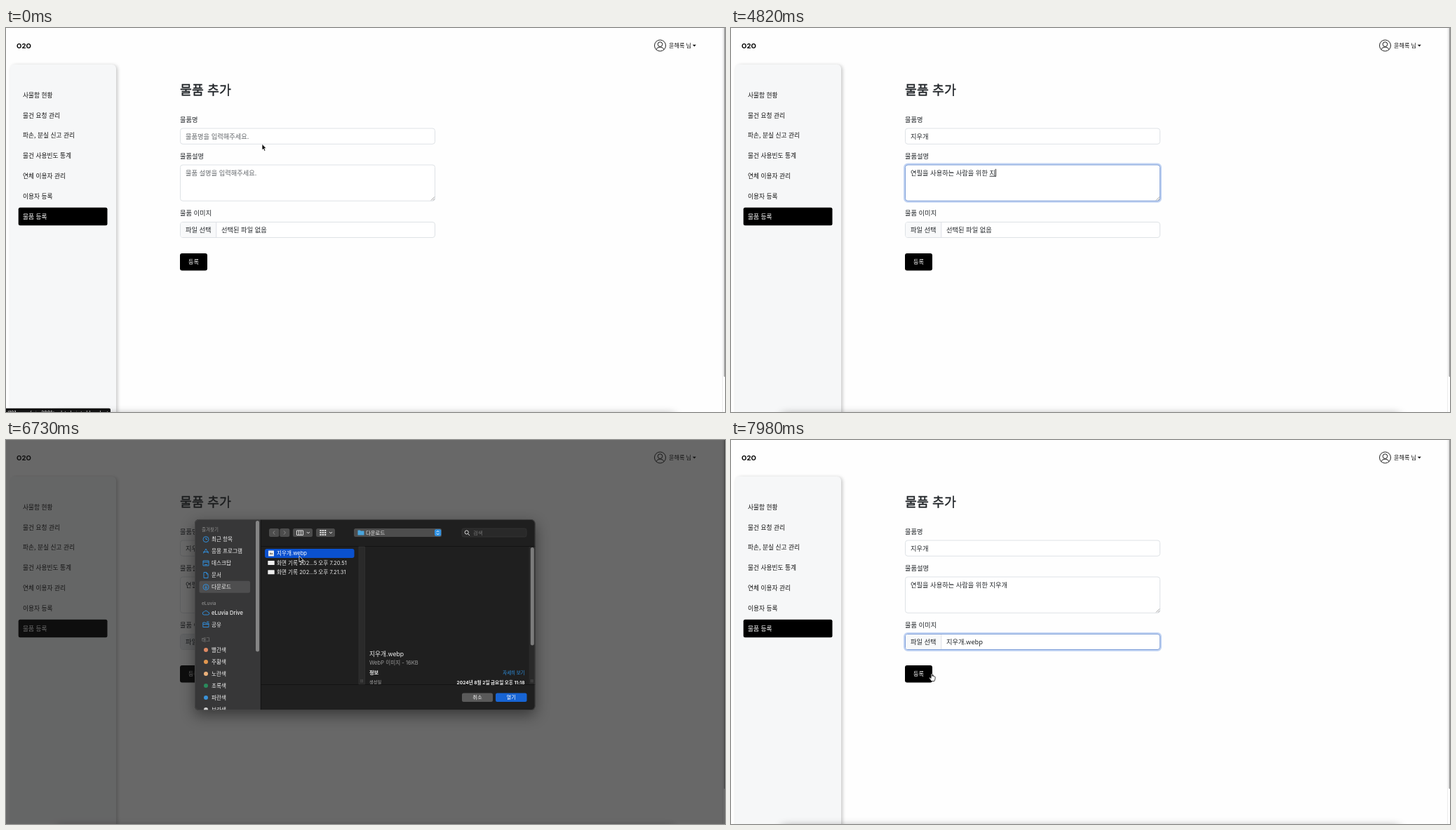
An HTML page that plays this animation: 1025x547 px, repeating every 8 s.

```html
<!DOCTYPE html>
<html lang="ko">
<head>
<meta charset="utf-8">
<title>물품 추가</title>
<style>
  html, body { margin: 0; width: 100%; height: 100%; overflow: hidden; background: #fefefe; }
  svg { display: block; width: 100vw; height: 100vh; font-family: "Noto Sans CJK KR", Inter, sans-serif; }
  text { white-space: pre; }
  .mac { font-family: Inter, "Noto Sans CJK KR", sans-serif; }
  #dialog { --accent: #2f93e6; filter: drop-shadow(0 7px 10px rgba(0,0,0,.45)); }
  .icon { fill: none; stroke: var(--accent); stroke-width: .9; }
  .compose { text-decoration: underline; }
</style>
</head>
<body>
<script>
const LOOP = 8000;
const text = (x, mid, s, size = 9.25, fill = '#212529', more = '') =>
  `<text x="${x}" y="${mid + size * .37}" font-size="${size}" fill="${fill}" ${more}>${s}</text>`;
const rect = (x, y, w, h, r, fill, more = '') =>
  `<rect x="${x}" y="${y}" width="${w}" height="${h}" rx="${r}" fill="${fill}" ${more}/>`;
const path = (d, more = 'class="icon"') => `<path d="${d}" ${more}/>`;
const circle = (x, y, r, more) => `<circle cx="${x}" cy="${y}" r="${r}" ${more}/>`;
const END = ' text-anchor="end"', MID = ' text-anchor="middle"', BOLD = ' font-weight="700"', MEDIUM = ' font-weight="500"';

// ---------- page ----------
const field = (id, y, h) =>
  rect(248.5, y, 363, h, 3.5, '#fff', 'stroke="#dee2e6"') +
  `<g id="${id}Ring">` + rect(248.5, y, 363, h, 3.5, 'none', 'stroke="#c2d4f3" stroke-width="5"') +
  rect(248.5, y, 363, h, 3.5, '#fff', 'stroke="#7f9fd8"') + '</g>';

const entry = (id, mid, hint) =>
  `<g id="${id}Hint">${text(256, mid, hint, 9.25, '#63676b')}</g>` +
  `<text id="${id}Text" x="256" y="${mid + 3.4}" font-size="9.25" fill="#212529"><tspan></tspan><tspan class="compose"></tspan></text>` +
  rect(256, mid - 5.5, .8, 11, 0, '#000', `id="${id}Caret"`);

const menu = ['사물함 현황', '물건 요청 관리', '파손, 분실 신고 관리', '물건 사용빈도 통계', '연체 이용자 관리', '이용자 등록', '물품 등록']
  .map((s, i) => text(24, 95.5 + i * 28.8, s, 8.72, i == 6 ? '#fff' : '#111')).join('');

const page =
  rect(0, 0, 1025, 547, 0, '#fefefe') +
  text(15, 25.3, 'O2O', 9.6, '#000', BOLD + ' class="mac"') +
  circle(932.5, 25, 8, 'fill="none" stroke="#222"') +
  circle(932.5, 23.2, 3.3, 'fill="none" stroke="#222"') +
  path('M926.8 30.6q1.6-3.4 5.7-3.4t5.7 3.4', 'fill="none" stroke="#222"') +
  text(945, 25, '윤해록 님', 8.1, '#111') + path('M978.8 23.8h5l-2.5 2.8z', 'fill="#111"') +
  rect(6, 52, 151, 520, 6, '#f6f7f8', 'style="filter:drop-shadow(2px 1px 2.5px rgba(0,0,0,.22))"') +
  rect(17.7, 255.7, 126.8, 25.6, 2.5, '#000') + menu +
  text(248, 88, '물품 추가', 18.4, '#212529', 'stroke="#212529" stroke-width=".35"') +
  text(248, 130.5, '물품명') + text(248, 182.8, '물품설명') + text(248, 264, '물품 이미지') +
  field('name', 143, 22.3) + entry('name', 154.2, '물품명을 입력해주세요.') +
  field('desc', 195, 51.3) + entry('desc', 206.3, '물품 설명을 입력해주세요.') +
  path('M606 245.5l5-5M608.8 245.5l2.2-2.2', 'stroke="#777" stroke-width=".7"') +
  field('file', 276.5, 22) +
  path('M300 277H251.5q-2.5 0-2.5 2.5v16q0 2.5 2.5 2.5H300z', 'id="pick"') +
  path('M299.8 277v21', 'stroke="#dee2e6"') +
  text(256, 287.7, '파일 선택') + text(307, 287.7, '', 9.25, '#212529', 'id="chosen"') +
  rect(248, 321, 39, 24.5, 3, '#000') + text(267.5, 333.3, '등록', 8.1, '#fff', MID) +
  rect(70, 550, 885, 20, 8, '#000', 'style="filter:drop-shadow(0 0 6px rgba(0,0,0,.4))"') +
  path('M1021.5 0v547', 'stroke="#ececec"') + rect(1023.4, -4, 4, 501, 1.5, '#a4a4a4') +
  `<g id="status" class="mac">${rect(-4, 541.8, 153, 12, 2, '#111')}` +
  text(-3, 548.2, '1d101.p.ssafy.io:3001/web/admin/addproduct', 7, '#fff') + '</g>';

// ---------- file dialog ----------
const side = (y, s, icon) => `<g transform="translate(285 ${y})">${icon}</g>` + text(293, y, s, 7.6, '#f0f0f0', MEDIUM);
const head = (y, s) => text(279, y, s, 6.5, '#8d8d8d', MEDIUM);
const ring = circle(0, 0, 4, 'class="icon"');
const tags = ['빨간색 #e08a64', '주황색 #e2974f', '노란색 #eab07a', '초록색 #2a8a5c', '파란색 #3a92d8', '보라색 #d0d0d0']
  .map((s, i) => { const [label, c] = s.split(' '); return side(299 + i * 17, label, circle(0, 0, 3, `fill="${c}"`)); }).join('');
const row = (y, s) => rect(373.3, y - 3, 9.4, 6, .6, '#eee') + text(386, y, s, 7.6, '#eee');
const grip = x => path(`M${x - 1} 341v4.5M${x + 1.2} 341v4.5`, 'stroke="#666" stroke-width=".7"');
const strip = x => rect(x, 152, 8.5, 196, 0, '#2a2a2a', 'stroke="#383838" stroke-width=".6"');
const pill = (x, w, fill) => rect(x, 126, w, 12, 2.5, fill);
const stroke = c => `fill="none" stroke="${c}" stroke-width="1"`;

const dialog =
  `<clipPath id="frame">${rect(269, 113, 485.5, 272, 6, '#000')}</clipPath><g clip-path="url(#frame)">` +
  rect(269, 113, 486, 272, 0, '#1f1f1f') + rect(269, 113, 94, 272, 0, '#373738') +
  path('M363.3 113v272M363 151.5h392M363 348.5h392', 'stroke="#111" stroke-width=".8" fill="none"') +
  rect(275.5, 200.7, 72.5, 17, 2.5, '#4e4e4f') +
  head(127.5, '즐겨찾기') +
  side(141.5, '최근 항목', ring + path('M0-2.5V0H2')) +
  side(158.5, '응용 프로그램', path('M-3.5 3L0-3.5 3.5 3M-4 1H4')) +
  side(175.5, '데스크탑', path('M-4-3.5H4V3.5H-4zM-4-1.5H4M-2 2H2')) +
  side(192.5, '문서', path('M-3-4H.8L3-1.6V4H-3zM.8-4V-1.6H3')) +
  side(209.5, '다운로드', ring + path('M0-2.2V2M-1.7.4L0 2 1.7.4')) +
  head(232.5, 'eLuvia') +
  side(246, 'eLuvia Drive', path('M-2.6 3H2.8a1.9 1.9 0 0 0 0-3.8A3 3 0 0 0-2.6-1.2a2.1 2.1 0 0 0 0 4.2z')) +
  side(263, '공유', path('M-4.2 3.5V-3H-1L0-2H4V3.5zM-4-.4H4M1-4H4.4')) +
  head(285, '태그') + tags +
  rect(356, 115, 5, 186.5, 2.5, '#858585') +
  pill(375, 14.3, '#4d4d4d') + pill(390.3, 14, '#4d4d4d') + pill(409, 28, '#4b4b4b') + pill(442, 27, '#4b4b4b') + pill(496, 125, '#4d4d4d') +
  path('M383.2 129.3l-2.4 2.7 2.4 2.7M396 129.3l2.4 2.7-2.4 2.7', stroke('#888')) +
  path('M414.5 129h9v6.5h-9zM417.5 129v6.5M420.5 129v6.5M428.8 131l2 2 2-2M461 131l2 2 2-2', stroke('#ddd')) +
  path('M447.3 129h9M447.3 132h9M447.3 135h9', 'stroke="#ddd" stroke-width="2" stroke-dasharray="2.4 .9"') +
  path('M501.5 128.5h3.3l1 1.1h4.7v6h-9z', 'fill="#4aa5dc"') + text(513, 132, '다운로드', 7.4, '#eee') +
  rect(611, 127.3, 9.2, 9.4, 2, 'var(--accent)') +
  path('M613.8 131.2l1.8-1.8 1.8 1.8M613.8 133l1.8 1.8 1.8-1.8', stroke('#fff')) +
  rect(650, 126, 92, 12, 2.5, '#292929', 'stroke="#383838" stroke-width=".7"') +
  circle(656.7, 131.5, 2.6, stroke('#ddd')) + path('M658.6 133.5l2.4 2.6', stroke('#ddd')) + text(666, 132, '검색', 7.4, '#777') +
  strip(503) + grip(507) +
  rect(369, 155, 127.5, 13, 3, '#0a51cf', 'id="selected"') +
  rect(374, 157.5, 8, 8, .5, '#eee') + path('M375.5 163l1.5-3 1.5 2 1-1.5 1.3 2.5z', 'fill="#777"') +
  text(386, 161.5, '지우개.webp', 7.6, '#fff') +
  `<g id="more">${row(175, '화면 기록 202…5 오후 7.20.51')}${row(188.3, '화면 기록 202…5 오후 7.21.31')}</g>` +
  `<g id="blank">${strip(651)}</g>` +
  `<g id="preview">${rect(745.5, 152, 9, 196, 0, '#292929')}${rect(747.8, 153, 5, 139.5, 2.5, '#7c7c7c')}${grip(749.7)}` +
  text(518, 304.5, '지우개.webp', 8.7, '#eee') + text(518, 317, 'WebP 이미지 - 16KB', 7.6, '#9a9a9a') +
  text(518, 331.4, '정보', 7.2, '#f2f2f2', BOLD) + text(739.5, 331.6, '자세히 보기', 6.4, 'var(--accent)', END) +
  text(518, 345.2, '생성일', 6.2, '#aaa') + text(739.5, 345.2, '2024년 8월 2일 금요일 오후 11:18', 6.6, '#eee', END + BOLD) + '</g>' +
  rect(650, 360.5, 44, 12.5, 2.5, '#5a5a5a') + text(672, 366.7, '취소', 7.3, '#f0f0f0', MID) +
  rect(698, 360.5, 44.5, 12.5, 2.5, '', 'id="open"') + text(720.2, 366.7, '열기', 7.3, '', MID + ' id="openText"') +
  '</g>' + rect(269.4, 113.4, 484.7, 271.2, 6, 'none', 'stroke="#4c4c4c" stroke-width=".8"');

const eraser = (x, y, w, h, a) => `<g transform="translate(${x} ${y}) rotate(${a})">` +
  rect(-w / 2, -h / 2, w, h, 1.5, '#e4e6e9', 'stroke="#b5bac4" stroke-width=".6"') +
  rect(-w / 2, -h * .36, w, h * .76, 0, '#2b4f8c') +
  rect(-w / 2, -h * .36, w, h * .12, 0, '#1c2f52') +
  rect(-w * .22, -h * .15, w * .44, h * .3, 1, '#bccbe2') + '</g>';

const photo = rect(567, 157, 124, 124.5, 3, '#e4e4e4') + rect(571, 161, 13, 13, 0, '#b8434c') +
  eraser(591, 224, 20, 70, 22) + eraser(631, 222, 28, 82, 18) + eraser(665, 223, 18, 78, 22);

// ---------- pointer ----------
const outline = 'fill="#000" stroke="#fff" stroke-width=".8" stroke-linejoin="round"';
const pointer =
  `<g id="arrow">${path('M0 0V8.6L1.9 6.9 3.3 10 4.9 9.3 3.5 6.3H6.1z', outline)}</g>` +
  `<g id="beam">${path('M-1.8-5q1.8 0 1.8 1.2V3.8Q0 5-1.8 5M1.8-5Q0-5 0-3.8V3.8Q0 5 1.8 5', 'fill="none" stroke="#222" stroke-width=".8"')}</g>` +
  `<g id="hand">${path('M-.9.8Q0-.4.9.8V4Q2-.2 2.5 4.1 3.6 3.4 3.9 4.6 5.2 4.1 5.2 5.8 5.2 8.5 3.9 11H-.5Q-1.6 9-3.2 7-3.8 5.4-2.4 5.7L-.9 7z',
    'fill="#fff" stroke="#111" stroke-width=".8" stroke-linejoin="round"')}</g>`;

document.body.innerHTML = `<svg viewBox="0 0 1025 547">${page}${rect(0, 0, 1025, 547, 0, '#161616', 'id="dim"')}` +
  `<g id="sheet"><g id="dialog" class="mac">${dialog}</g><g id="photo">${photo}</g></g><g id="pointer">${pointer}</g></svg>`;

// ---------- motion ----------
const $ = id => document.getElementById(id);
const show = (id, on) => { $(id).style.opacity = +on; };

// Value of the last key reached.
const hold = (t, keys) => keys.reduce((v, k) => t >= k[0] ? k[1] : v, keys[0][1]);
// Linear or eased travel between keys.
function track(t, keys, ease = u => u) {
  const i = keys.findIndex(k => k[0] > t);
  if (i < 0) return keys.at(-1)[1];
  if (!i) return keys[0][1];
  const [t0, a] = keys[i - 1], [t1, b] = keys[i];
  return a + (b - a) * ease((t - t0) / (t1 - t0));
}
const smooth = u => u * u * (3 - 2 * u);
const fade = (t, on, off) => track(t, [[on, 0], [on + 150, 1], [off, 1], [off + 150, 0]]);

// Each key press of a Hangul input method: [finished text, syllable in work].
function keystrokes(s) {
  const leads = 'ㄱㄲㄴㄷㄸㄹㅁㅂㅃㅅㅆㅇㅈㅉㅊㅋㅌㅍㅎ', out = [['', '']];
  [...s].forEach((c, i) => {
    const done = s.slice(0, i), n = c.charCodeAt(0) - 0xAC00;
    if (n < 0) return out.push([done + c, '']);
    out.push([done, leads[Math.floor(n / 588)]]);
    out.push([done, String.fromCharCode(0xAC00 + n - n % 28)]);
    if (n % 28) out.push([done, c]);
  });
  return out;
}
const nameKeys = keystrokes('지우개'), descKeys = keystrokes('연필을 사용하는 사람을 위한 지우개');

function type(id, keys, count, focused) {
  const [done, work] = keys[Math.floor(count + 1e-6)], el = $(id + 'Text'), [a, b] = el.children;
  a.textContent = done;
  b.textContent = work;
  b.style.textDecoration = focused ? '' : 'none';
  show(id + 'Hint', !(done + work));
  show(id + 'Caret', focused);
  $(id + 'Caret').setAttribute('x', 256 + el.getComputedTextLength());
}

const moveX = [[860, 365], [1330, 358], [2350, 358], [2850, 344], [5510, 344], [5930, 278], [6190, 406.5],
  [6320, 409], [6590, 418], [6930, 418], [7350, 366], [7490, 366], [7980, 286]];
const moveY = [[860, 165.3], [1330, 155], [2350, 155], [2850, 217], [5510, 217], [5930, 288], [6190, 281],
  [6320, 260], [6590, 165], [6930, 165.5], [7350, 190], [7490, 190], [7980, 332.5]];

function pointerKind(t, x, y) {
  if (t >= 6050 && t < 6930) return t < 6850 ? 'arrow' : 'hand';
  const inside = (y0, y1, x1 = 611) => x > 248 && x < x1 && y > y0 && y < y1;
  if (inside(143, 164) || inside(195, 246)) return 'beam';
  return inside(276, 299) || inside(321, 346, 287) ? 'hand' : 'arrow';
}

function render(t) {
  show('status', t < 930);
  show('nameRing', fade(t, 1330, 2900));
  show('descRing', fade(t, 2900, 5930));
  show('fileRing', t >= 6790);
  type('name', nameKeys, hold(t, [[0, 0], [1620, 1], [1750, 2], [1820, 3], [1890, 4], [1960, 5], [2090, 6]]), t >= 1400 && t < 2900);
  type('desc', descKeys, t < 3190 ? 0 : track(t, [[3190, 1], [3940, 23], [4010, 24], [4540, 37], [4820, 38],
    [5029, 38], [5030, 40], [5169, 40], [5170, 41], [5240, 42]]), t >= 2900 && t < 5930);
  $('pick').setAttribute('fill', t >= 5860 && t < 6790 ? '#e9ecef' : '#f8f9fa');
  $('chosen').textContent = t < 7010 ? '선택된 파일 없음' : '지우개.webp';

  const closing = t >= 6790, picked = t >= 6730;
  show('dim', hold(t, [[0, 0], [6120, .12], [6190, .366], [6260, .645], [6790, .48], [6860, .21], [6930, 0]]));
  show('dialog', hold(t, [[0, 0], [6120, .5], [6190, 1], [6790, .85], [6860, .3], [6930, 0]]));
  show('photo', hold(t, [[0, 0], [6790, .95], [6860, .7], [6930, 0]]));
  $('sheet').setAttribute('transform', `translate(0 ${hold(t, [[0, -18], [6190, -9], [6260, 0], [6790, -5], [6860, -16.3]])})`);
  $('dialog').style.setProperty('--accent', closing ? '#777' : '#2f93e6');
  show('more', t >= 6320);
  show('selected', picked);
  show('blank', !picked);
  show('preview', picked);
  $('selected').setAttribute('fill', closing ? '#4a4a4a' : '#0a51cf');
  $('open').setAttribute('fill', closing ? '#5a5a5a' : picked ? '#1764d4' : '#393939');
  $('openText').setAttribute('fill', picked ? '#fff' : '#777');

  const x = track(t, moveX, smooth), y = track(t, moveY, smooth), kind = pointerKind(t, x, y);
  $('pointer').setAttribute('transform', `translate(${x} ${y})`);
  show('pointer', !(t >= 1620 && t < 2350 || t >= 3190 && t < 5510));
  ['arrow', 'beam', 'hand'].forEach(k => show(k, k == kind));
}

function tick() {
  render(performance.now() % LOOP);
  requestAnimationFrame(tick);
}
tick();
</script>
</body>
</html>
```
